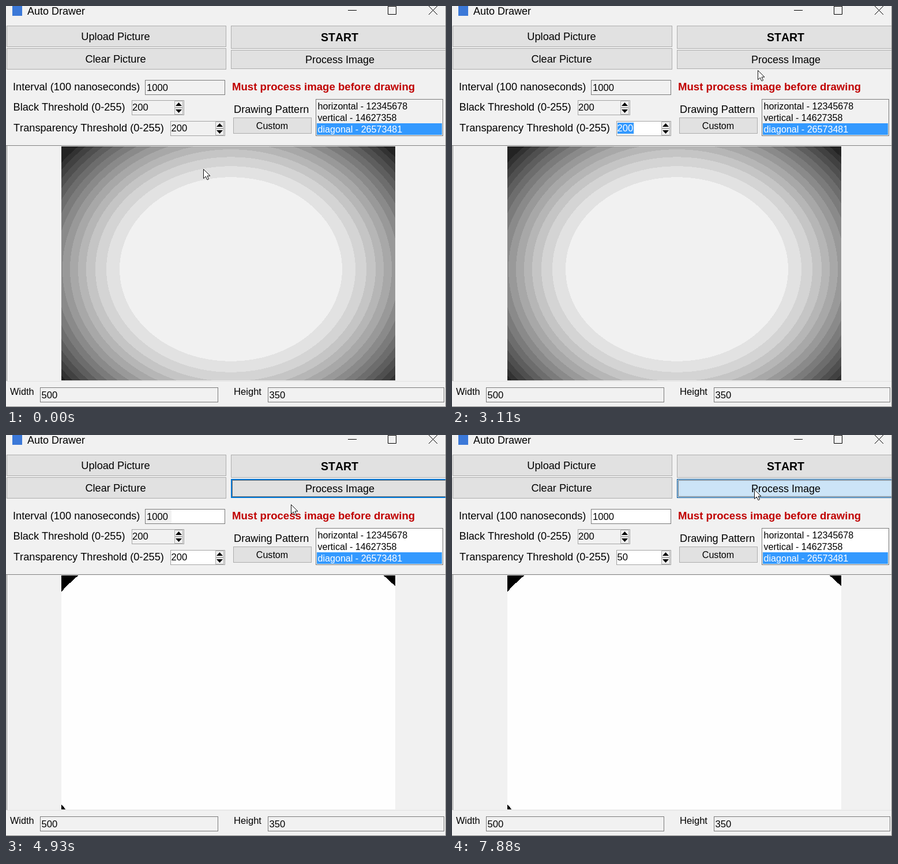
An HTML page that plays this animation: 763x694 px, repeating every 8000 ms.

```html
<!DOCTYPE html>
<html lang="en">
<head>
<meta charset="utf-8">
<title>Auto Drawer</title>
<style>
html, body { margin: 0; width: 100%; height: 100%; overflow: hidden; background: #f1f1f1; }
svg { display: block; font: 18.2px "Liberation Sans", Arial, sans-serif; font-kerning: none; }
.mid { text-anchor: middle; }
.btn { fill: #e1e1e1; stroke: #adadad; }
.box { fill: none; stroke: #7a7a7a; }
.spin { fill: none; stroke: #a4a4a4; }
.small { font-size: 16.1px; }
.val { font-size: 16.6px; }
.line { fill: none; stroke: #000; }
</style>
</head>
<body>
<svg width="763" height="694" viewBox="0 0 763 694">
  <rect x="11" width="17" height="17" fill="#3b78d8"/>
  <text x="37" y="15" font-size="18">Auto Drawer</text>
  <path class="line" d="M593 7.5h15M662.5 .5h14v14h-14zM733 0l15 15M748 0l-15 15"/>

  <rect class="btn" x="1.5" y="34.5" width="380" height="36"/>
  <rect class="btn" x="1.5" y="73.5" width="380" height="36"/>
  <rect class="btn" x="390.5" y="34.5" width="380" height="39"/>
  <rect class="btn" id="process" y="76"/>
  <rect class="line" id="focus" x="392.5" y="78.5" width="380" height="28" stroke-dasharray="1 1"/>
  <g class="mid">
    <text x="190" y="59">Upload Picture</text>
    <text x="190" y="98">Clear Picture</text>
    <text x="578.5" y="61" font-size="19.5" font-weight="bold">START</text>
    <text x="579" y="99" font-size="18">Process Image</text>
  </g>

  <g id="whites" fill="#fff">
    <rect id="whiteInterval" y="129" height="25"/>
    <rect id="whiteList" x="538" y="162" width="219" height="60"/>
    <rect id="whiteTrans" y="200" height="24"/>
  </g>

  <text x="12" y="146">Interval (100 nanoseconds)</text>
  <text x="12.5" y="181">Black Threshold (0-255)</text>
  <text x="13" y="217">Transparency Threshold (0-255)</text>
  <text x="392" y="146" font-size="18.6" font-weight="bold" fill="#c00000">Must process image before drawing</text>
  <text x="395" y="185">Drawing Pattern</text>

  <rect class="box" x="241.5" y="128.5" width="138" height="25"/>
  <text class="val" x="244" y="147">1000</text>
  <rect class="spin" x="218.5" y="163.5" width="90" height="25"/>
  <text class="val" x="219" y="181">200</text>
  <rect class="spin" x="285.5" y="199.5" width="94" height="25"/>
  <rect id="sel" y="202" height="19" fill="#3399ff"/>
  <text class="val" x="286.5" y="217"><tspan id="plain"></tspan><tspan id="picked" fill="#fff"></tspan></text>
  <g id="spinners"></g>

  <rect class="btn" x="394.5" y="193.5" width="135" height="27"/>
  <text class="mid small" x="461.5" y="213">Custom</text>
  <rect class="box" x="537.5" y="161.5" width="220" height="63"/>
  <rect x="539" y="203" width="217" height="20" fill="#3399ff"/>
  <g class="small">
    <text x="540.5" y="179">horizontal - 12345678</text>
    <text x="540.5" y="199">vertical - 14627358</text>
    <text x="540.5" y="219" fill="#fff">diagonal - 26573481</text>
  </g>

  <path fill="none" stroke="#808080" d="M0 241.5H763M1.5 242V649"/>
  <path fill="none" stroke="#e2e2e2" d="M1 649.5H763"/>
  <svg x="96" y="243" width="579" height="405" viewBox="96 243 579 405" shape-rendering="crispEdges">
    <g id="rings"></g>
    <g id="result">
      <rect x="96" y="243" width="579" height="405"/>
      <ellipse cx="390" cy="455.5" rx="369" ry="304.8" fill="#fefefe"/>
    </g>
  </svg>

  <text x="7" y="673" font-size="16.3">Width</text>
  <rect class="box" x="59.5" y="660.5" width="308" height="25"/>
  <text class="val" x="61.5" y="679">500</text>
  <text x="395" y="673" font-size="16.6">Height</text>
  <rect class="box" x="454.5" y="660.5" width="305" height="25"/>
  <text class="val" x="456.5" y="679">350</text>
  <path fill="none" stroke="#8a8a8a" d="M762.5 0V694M0 693.5H763"/>

  <path id="arrow" fill="#fff" stroke="#111" d="M.5 .5V16.5L4.3 13L7 18.8L9.6 17.6L7 12H12z"/>
  <path id="beam" class="line" stroke-width="1.4" d="M-4 -8H-1L0 -7L1 -8H4M0 -7V7M-4 8H-1L0 7L1 8H4"/>
</svg>
<script>
const LOOP = 8000;
const $ = id => document.getElementById(id);
const set = (id, attrs) => {
  for (const k in attrs) $(id).setAttribute(k, attrs[k]);
};
const show = (id, on) => set(id, { visibility: on ? "visible" : "hidden" });

// Concentric bands, darkest first
const radii = [193, 216, 235, 251, 265, 279, 292, 304.5, 316.5, 328, 339, 349.5, 360, 369];
const gray = k => `rgb(${Array(3).fill(Math.round(241 - 14.7 * k))})`;
$("rings").innerHTML = `<rect x="96" y="243" width="579" height="405" fill="${gray(radii.length)}"/>` +
  radii.map((r, k) => `<ellipse cx="390" cy="455.5" rx="${r}" ry="${r * 0.826}" fill="${gray(k)}"/>`)
    .reverse().join("");

const spinner = (x, y) =>
  `<path fill="#f0f0f0" stroke="#acacac" d="M${x}.5 ${y}.5h14v11h-14zM${x}.5 ${y + 12}.5h14v11h-14z"/>
   <path d="M${x + 2} ${y + 9}l5.5 -6l5.5 6zM${x + 2} ${y + 15}h11l-5.5 6z"/>`;
$("spinners").innerHTML = spinner(292, 164) + spinner(363, 200);

// Pointer path: time, x, y
const path = [
  [0, 342, 282], [130, 342, 282], [330, 334, 308], [780, 321, 209], [1150, 321, 209],
  [1300, 325, 209], [1650, 257, 213], [1860, 268, 212], [2109, 268, 212], [2110, 318, 208],
  [2160, 318, 208], [2870, 389, 194], [2930, 420, 176], [3110, 530, 111], [3170, 530, 111],
  [3320, 545, 92], [3450, 542, 90], [4810, 542, 90], [4930, 494, 120], [4990, 494, 120],
  [5460, 319, 209], [5640, 319, 209], [5950, 262, 211], [6050, 267, 211], [7289, 267, 211],
  [7290, 325, 200], [7700, 518, 99], [7880, 524, 94], [LOOP, 524, 94]
];

function pointer(t) {
  const i = path.findIndex(p => p[0] > t);
  const [t0, x0, y0] = path[i - 1], [t1, x1, y1] = path[i];
  const u = (t - t0) / (t1 - t0);
  return [x0 + (x1 - x0) * u, y0 + (y1 - y0) * u];
}

function drawProcess(hover, pressed, focused) {
  const thick = focused && !hover && !pressed;
  const edge = thick ? 1 : 0.5;
  set("process", {
    x: 390 + edge, y: 76 + edge, width: 380, height: 33 - 2 * edge,
    style: `fill:${pressed ? "#cce4f7" : hover ? "#e5f1fb" : "#e1e1e1"};` +
      `stroke:${pressed ? "#005499" : hover || focused ? "#0078d7" : "#adadad"};` +
      `stroke-width:${2 * edge}`
  });
  show("focus", focused);
}

function drawThreshold(t, x) {
  const value = t < 6480 ? "200" : t < 6790 ? "5" : "50";
  let start = value.length;
  const dragging = (t >= 1150 && t < 1600) || (t >= 5640 && t < 5930);
  if (dragging) start = x < 291 ? 0 : x < 301 ? 1 : x < 311 ? 2 : 3;
  else if ((t >= 1600 && t < 3450) || (t >= 5930 && t < 6480)) start = 0;
  $("plain").textContent = value.slice(0, start);
  $("picked").textContent = value.slice(start);
  const left = 287 + Math.round(start * 9.33);
  set("sel", { x: left, width: Math.max(0, 315 - left) });
  show("sel", start < value.length);
}

function draw(t) {
  const [x, y] = pointer(t);
  const inField = x > 284 && x < 363 && y > 199 && y < 224;
  const visible = t < 6480 || t >= 7290;
  show("arrow", visible && !inField);
  show("beam", visible && inField);
  set(inField ? "beam" : "arrow", { transform: `translate(${Math.round(x) + (inField ? 0.5 : 0)} ${Math.round(y)})` });

  const pressed = (t >= 3450 && t < 3820) || t >= 7880;
  const hover = visible && x > 390 && y >= 76 && y < 109;
  drawProcess(hover, pressed, (t >= 3450 && t < 5640) || t >= 7880);
  drawThreshold(t, x);

  const white = t >= 3450;
  const from = t >= 7880 ? 242 : 287;
  set("whiteInterval", { x: from, width: 379 - from });
  show("whiteInterval", white);
  show("whiteList", white);
  set("whiteTrans", white ? { x: 287, width: 76 } : { x: 316, width: 47 });
  show("whiteTrans", t >= 2400);
  show("result", t >= 4190);
}

const begin = performance.now();
function tick() {
  draw((performance.now() - begin) % LOOP);
  requestAnimationFrame(tick);
}
tick();
</script>
</body>
</html>
```
